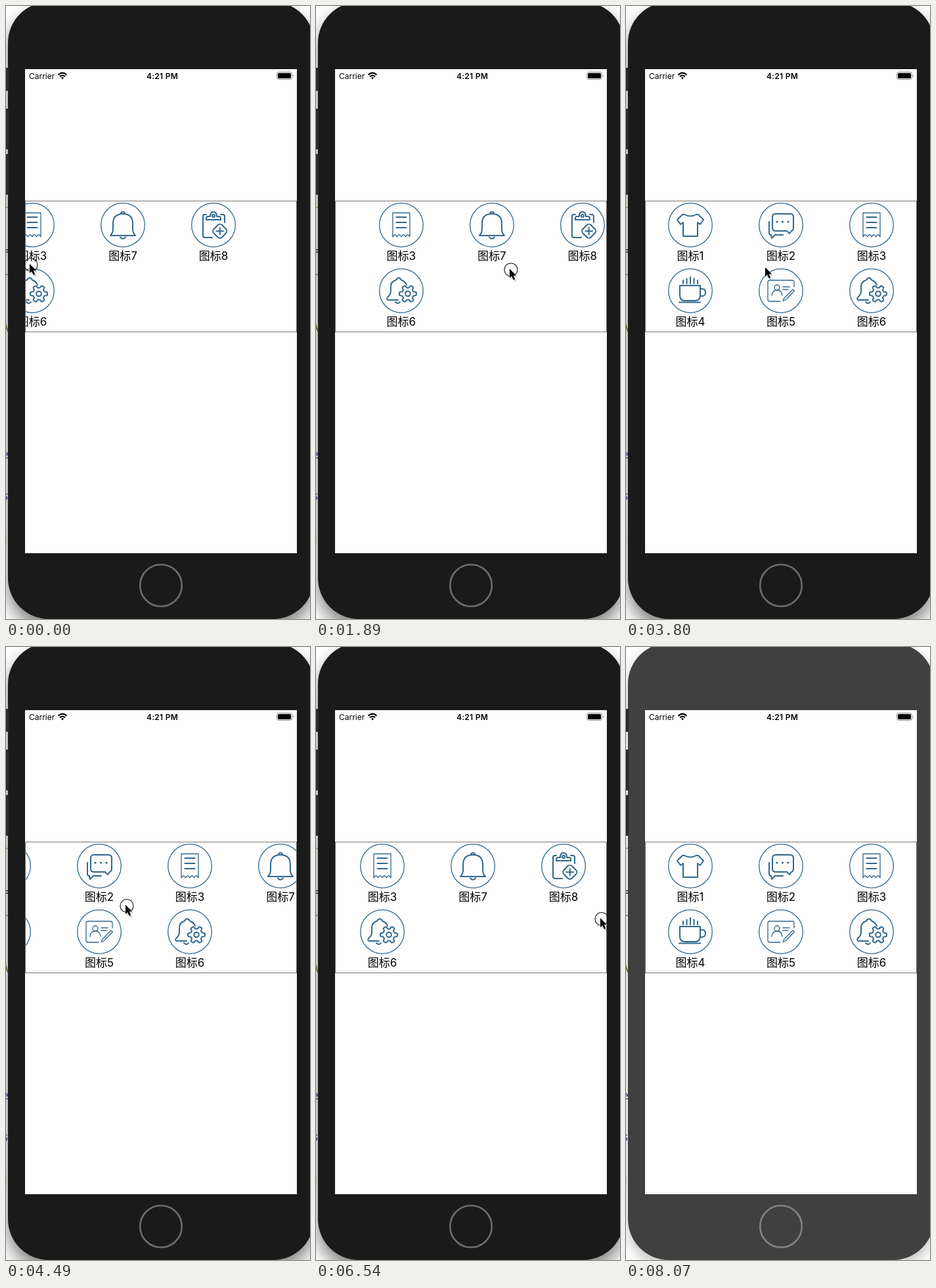
These frames come from a looping animation (463x932 px, 8.12 s). An HTML page:

```html
<!DOCTYPE html>
<html lang="zh-CN">
<head>
<meta charset="utf-8">
<title>Paged icon grid</title>
<style>
  html, body { margin: 0; width: 100%; height: 100%; overflow: hidden; background: #fff; }
  svg { display: block; width: 463px; height: 932px; }
  text { font-family: Inter, "Noto Sans CJK SC", "Noto Sans CJK", sans-serif; }
  #phone { fill: #1a1a1a; filter: drop-shadow(0 14px 13px rgba(0, 0, 0, .5)); }
  #home { fill: none; stroke: #6c6c6c; stroke-width: 2.6; }
  .idle #phone { fill: #404040; filter: drop-shadow(0 8px 10px rgba(0, 0, 0, .26)); }
  .idle #home { stroke: #828282; }
  .code text { font: 17px "DejaVu Sans Mono", monospace; text-anchor: end; }
  .icon { fill: none; stroke: #31688d; stroke-width: 2; stroke-linecap: round; stroke-linejoin: round; }
  .icon .thin { stroke-width: 1.3; }
  .icon .dot { fill: #31688d; stroke: none; }
  .label { font-size: 17px; text-anchor: middle; }
  .status { font-size: 12px; }
  .time { font-weight: 600; text-anchor: middle; letter-spacing: .25px; }
</style>
</head>
<body>
<svg id="stage" viewBox="0 0 463 932">
  <defs>
    <clipPath id="panel"><rect x="29" y="296" width="414" height="200"/></clipPath>
  </defs>
  <rect id="phone" x="3" y="-6" width="466" height="938" rx="62"/>
  <g class="code">
    <path d="M0 306H3" stroke="#8c9440" stroke-width="1.5"/>
    <text x="4" y="378" fill="#222">=</text>
    <text x="4" y="409" fill="#5a36a0">l</text>
    <text x="4" y="495" fill="#52662b">A</text>
    <text x="4" y="688" fill="#5b2c83">e</text>
    <text x="4" y="751" fill="#5b2c83">s</text>
    <text x="4" y="817" fill="#4c4520">]</text>
  </g>
  <path d="M0 94H4V129H0ZM0 156H4V218H0ZM0 225H4V287H0Z" fill="#2b2b2b"/>
  <circle id="home" cx="236" cy="881" r="31.8"/>
  <rect x="29" y="96" width="414" height="736" fill="#fefefe"/>

  <text class="status" x="35" y="110.5">Carrier</text>
  <g fill="none" stroke="#000" stroke-width="2.1">
    <path d="M79.6 104.6Q86 98.8 92.4 104.6M82 107.3Q86 103.8 90 107.3"/>
    <path d="M86 111.4L83.9 109Q86 107.4 88.1 109Z" fill="#000" stroke="none"/>
  </g>
  <text class="status time" x="238" y="110.5">4:21 PM</text>
  <rect x="412.5" y="100.5" width="23" height="11" rx="3" fill="none" stroke="#888"/>
  <rect x="414" y="102" width="20" height="8" rx="1.6"/>
  <path d="M437 104.2Q439 106 437 107.8Z" fill="#888"/>

  <g clip-path="url(#panel)"><g id="grid"></g></g>
  <rect x="29.5" y="296.5" width="413" height="199" fill="none" stroke="#777"/>

  <g id="cursor">
    <circle id="ring" cx="2" cy="1.5" r="10" fill="none" stroke="#111" stroke-width="1.1"/>
    <path d="M2 3V17L5 14L8 20L10.5 19L8 13H12Z" opacity=".18"/>
    <path d="M0 0V14.2L3.2 11.2L5.7 17L8.2 16L5.8 10.3H10.2Z" stroke="#fff" paint-order="stroke"/>
  </g>
</svg>
<script>
const LOOP = 8120, IDLE_AT = 8070, TICK = 10;
const PAGE = 414, COLUMN = PAGE / 3, SETTLE = 360;
const $ = id => document.getElementById(id);
const path = (d, cls = "") => `<path class="${cls}" d="${d}"/>`;
const circle = (x, y, r, cls = "") => `<circle class="${cls}" cx="${x}" cy="${y}" r="${r}"/>`;
const box = (x, y, w, h, r, extra = "") =>
  `<rect x="${x}" y="${y}" width="${w}" height="${h}" rx="${r}" ${extra}/>`;
const mix = (a, b, p) => a + (b - a) * p;

// Six rounded teeth around (cx, cy)
function gear(cx, cy) {
  const points = Array.from({ length: 120 }, (_, i) => {
    const a = i / 60 * Math.PI;
    const r = 11 + 2 * Math.tanh(3 * Math.cos(6 * a));
    return `${cx + r * Math.cos(a)} ${cy + r * Math.sin(a)}`;
  });
  return path("M" + points.join("L") + "Z") + circle(cx, cy, 3.8);
}

const steam = [-2, -1, 0, 1, 2].map(i => `M${i * 5.5} ${-21 + 2.5 * Math.abs(i)}V-11`).join("");

const shirt = path("M-9-16Q0-11 9-16H12L20-8L15-1L11-4V17H-11V-4L-15-1L-20-8L-12-16Z");
const chat = path("M-8-17H14Q19-17 19-12V4Q19 8 16 9L13 13L9 9H-8Q-13 9-13 4V-12Q-13-17-8-17Z")
  + path("M-18-5V12Q-18 15-15 15L-14 20L-9 15H3")
  + [-6, 2.5, 11].map(x => circle(x, -5, 1.6, "dot")).join("");
const receipt = path("M-13 18V-18.5H13V18" + "q-3.25-6.5-6.5 0".repeat(4), "thin")
  + [-12, -4, 4].map(y => path(`M-7.5 ${y}H7.5`)).join("");
const cup = path("M-16-8H15V7Q15 15 7 15H-8Q-16 15-16 7Z")
  + path("M15-3H18Q23-3 23 2.5Q23 8 18 8H15M-17 17.5H15" + steam);
const card = path("M-1 16H-17Q-20 16-20 13V-13Q-20-16-17-16H17Q20-16 20-13V-6", "thin")
  + circle(-6, -5, 4, "thin") + path("M-14 7Q-13-1-6-1Q1-1 2 7M3-6H13M3-2H11", "thin")
  + path("M18-2L5 11L3 15.5L7.5 13.5L20.5 0Z", "thin");
const alertGear = path("M-2 17Q-5 21-9 17M-5 14H-20Q-23 13-21 10Q-16 6-16 0V-6Q-16-14-8-16.5Q-4-23 0-16.5Q6-14 8-9")
  + gear(10, 4.5);
const bell = path("M-19 16H19Q15 12 15 6V-2Q15-17 0-17Q-15-17-15-2V6Q-15 12-19 16Z")
  + path("M-3-17A3 3 0 0 1 3-17M-4 18.5Q0 23 4 18.5");
const clipboard = path("M-11-16H-13Q-16-16-16-13V16Q-16 19-13 19H-2M11-16H14Q17-16 17-13V-4")
  + path("M-11-8V-10Q-11-13-8-13H-5Q-5-20 0-20Q5-20 5-13H8Q11-13 11-10V-8Z") + circle(0, -14, 2)
  + box(1, 0.5, 17.5, 17.5, 4.5, 'transform="rotate(45 9.75 9.25)"')
  + path("M4.5 9.25H15M9.75 4V14.5");

// The grid fills page by page: three columns, two rows
const icons = [shirt, chat, receipt, cup, card, alertGear, bell, clipboard];
$("grid").innerHTML = icons.map((art, i) => {
  const column = i % 3 + 3 * Math.floor(i / 6), row = Math.floor(i / 3) % 2;
  return `<g transform="translate(${98 + COLUMN * column} ${333 + 100 * row})">
    <g class="icon">${circle(0, 0, 33.3, "thin")}${art}</g>
    <text class="label" y="52.5">图标${i + 1}</text>
  </g>`;
}).join("");

// Pointer strokes: start and end time, then where the tip arrives
const home = { x: 36, y: 392 };
const strokes = [
  [90, 300, 32, 393], [300, 820, 125, 403], [1060, 1410, 210, 403], [1410, 2100, 332, 398],
  [2830, 3340, 155, 402], [3640, 3980, 276, 392], [4080, 4490, 182, 392], [4490, 4880, 29, 396],
  [4930, 5400, 155, 403], [5800, 6180, 292, 409], [6180, 6540, 433, 412], [6600, 6900, 387, 454],
  [6960, 7020, 317, 511], [7200, 7860, 425, 935]
];
// Presses on the grid; a drag pulls the page along from where it was grabbed
const drags = [
  { down: 0, up: 150, grabX: 370, from: 0, to: 1 },
  { down: 1060, up: 2120, grabX: 125, from: 1, to: 0 },
  { down: 2770, up: 2830, grabX: 332, from: 0, to: 0 },
  { down: 4080, up: 4900, grabX: 276, from: 0, to: 1 },
  { down: 6180, up: 6580, grabX: 292, from: 1, to: 0 }
];

function pointer(t) {
  let { x, y } = home;
  for (const [start, end, toX, toY] of strokes) {
    if (t < start) break;
    const p = Math.min(1, (t - start) / (end - start));
    x = mix(x, toX, p);
    y = mix(y, toY, p);
  }
  return { x, y };
}

function scroll(t) {
  const drag = drags.findLast(d => t >= d.down);
  const pulled = drag.from * PAGE + drag.grabX - pointer(Math.min(t, drag.up)).x;
  const p = Math.min(1, Math.max(0, t - drag.up) / SETTLE);
  return mix(pulled, drag.to * PAGE, 1 - (1 - p) ** 3);
}

const began = performance.now();
function draw() {
  const now = (performance.now() - began) % LOOP;
  const t = now - now % TICK;
  const { x, y } = pointer(t);
  $("grid").setAttribute("transform", `translate(${-scroll(t)} 0)`);
  $("cursor").setAttribute("transform", `translate(${x} ${y})`);
  $("ring").style.display = drags.some(d => t >= d.down && t < d.up) ? "" : "none";
  $("stage").classList.toggle("idle", t >= IDLE_AT);
  requestAnimationFrame(draw);
}
draw();
</script>
</body>
</html>
```
